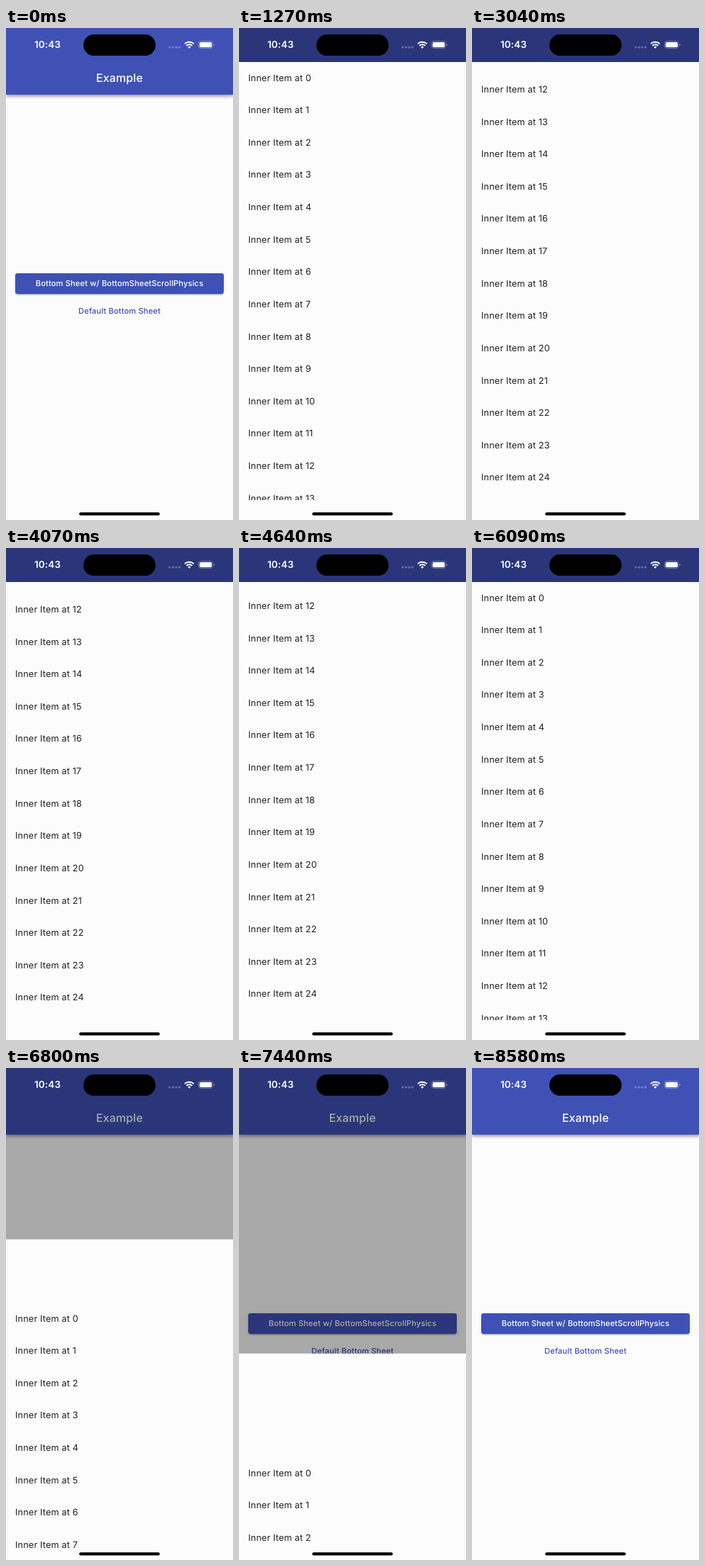
These frames come from a looping animation (320x694 px, 8660 ms). An HTML page:

```html
<!DOCTYPE html>
<html lang="en">
<head>
<meta charset="utf-8">
<title>Bottom sheet</title>
<style>
  html, body { margin: 0; width: 100%; height: 100%; overflow: hidden; background: #fcfcfc; }
  #stage {
    position: absolute; left: 0; top: 0; width: 320px; height: 694px; overflow: hidden;
    background: #fcfcfc; color: #212121;
    font-family: Inter, "Open Sans", sans-serif; white-space: nowrap;
    text-rendering: geometricPrecision;
  }
  #stage div, #stage svg { position: absolute; }
  .bar { left: 0; top: 0; width: 320px; height: 94px; background: #3f51b5;
    box-shadow: 0 1.6px 3.3px rgba(0,0,0,.2), 0 3.3px 4px rgba(0,0,0,.14), 0 .8px 8px rgba(0,0,0,.12); }
  .title { left: 0; width: 320px; top: 61px; line-height: 20px; text-align: center;
    font-size: 15.9px; letter-spacing: .2px; font-weight: 500; color: #fff; }
  .button { left: 13px; width: 294px; top: 346px; height: 29.3px; line-height: 29px;
    border-radius: 3.3px; overflow: hidden; text-align: center;
    font-size: 11.15px; letter-spacing: .13px; font-weight: 500; color: #fff; background: #3f51b5; }
  .shadow { left: 13px; width: 294px; top: 346px; height: 29.3px; border-radius: 3.3px;
    box-shadow: 0 2px 1px -1px rgba(0,0,0,.2), 0 1.6px 1.6px rgba(0,0,0,.14), 0 .8px 4px rgba(0,0,0,.12); }
  #ripple { left: 0; top: -132px; width: 294px; height: 294px; border-radius: 50%; background: #fff; }
  .link { left: 0; width: 320px; top: 389px; line-height: 20px; text-align: center;
    font-size: 11.15px; letter-spacing: .13px; font-weight: 500; color: #3f51b5; }
  #scrim { inset: 0; background: #000; }
  #sheet { left: 0; top: 48px; width: 320px; height: 646px; background: #fcfcfc; }
  .viewport { left: 0; top: 0; width: 320px; height: 618.4px; overflow: hidden; }
  #list { left: 13px; top: .6px; }
  #list div { height: 45.6px; line-height: 45.6px; font-size: 12.7px; letter-spacing: .15px; }
  .clock { left: 18.5px; width: 80px; top: 14.3px; line-height: 20px; text-align: center;
    font-size: 13.5px; letter-spacing: .15px; font-weight: 600; color: #fff; }
</style>
</head>
<body>
<div id="stage">
  <div class="bar"></div>
  <div class="title">Example</div>
  <div class="shadow"></div>
  <div class="button"><div id="ripple"></div>Bottom Sheet w/ BottomSheetScrollPhysics</div>
  <div class="link">Default Bottom Sheet</div>
  <div id="scrim"></div>
  <div id="sheet"><div class="viewport"><div id="list"></div></div></div>
  <div class="clock">10:43</div>
  <svg width="320" height="694" fill="#fff">
    <rect x="109.1" y="9" width="101.8" height="30.1" rx="15.05" fill="#000"/>
    <g opacity=".27">
      <circle cx="230.7" cy="27.2" r="1.6"/><circle cx="235.3" cy="27.2" r="1.6"/>
      <circle cx="239.9" cy="27.2" r="1.6"/><circle cx="244.5" cy="27.2" r="1.6"/>
    </g>
    <g fill="none" stroke="#fff" stroke-width="1.9">
      <path d="M252 22.4a9 9 0 0 1 12.8 0"/>
      <path d="M254.4 25a5.6 5.6 0 0 1 8 0"/>
    </g>
    <path d="M258.4 28.9l-2.1-2.2a3 3 0 0 1 4.2 0z"/>
    <rect x="271.4" y="18.6" width="20" height="10" rx="3.2" fill="none" stroke="#fff" stroke-width=".8" opacity=".4"/>
    <rect x="272.8" y="20" width="17.2" height="7.2" rx="2"/>
    <path d="M292.6 21.9v3.4a1.8 1.8 0 0 0 0-3.4z" opacity=".45"/>
    <rect x="103.2" y="683.3" width="113.6" height="4.2" rx="2.1" fill="#000"/>
  </svg>
</div>
<script>
  const LOOP = 8660, ROW = 45.615, ROWS = 25, VIEW = 618.4, SHEET = 646;
  const END = ROW * ROWS - VIEW;
  const el = id => document.getElementById(id);
  const ripple = el('ripple'), scrim = el('scrim'), sheet = el('sheet'), list = el('list');

  for (let i = 0; i < ROWS; i++) {
    const row = document.createElement('div');
    row.style.top = i * ROW + 'px';
    row.textContent = 'Inner Item at ' + i;
    list.append(row);
  }

  const progress = (t, from, to) => Math.min(1, Math.max(0, (t - from) / (to - from)));

  const bezier = (x1, y1, x2, y2) => x => {
    const at = (a, b, s) => 3 * (1 - s) * (1 - s) * s * a + 3 * (1 - s) * s * s * b + s * s * s;
    let lo = 0, hi = 1;
    for (let i = 0; i < 24; i++) {
      const mid = (lo + hi) / 2;
      if (at(x1, x2, mid) < x) lo = mid; else hi = mid;
    }
    return at(y1, y2, hi);
  };
  const decelerate = bezier(0, 0, 0.2, 1);
  const ease = bezier(0.25, 0.1, 0.25, 1);

  // Overdamped bounce: start at offset x0 with velocity v (px/s), t in ms.
  const SLOW = 9.08, FAST = 22.03;
  function spring(t, x0, v) {
    const s = t / 1000, gap = FAST - SLOW;
    const x = ((FAST * x0 + v) * Math.exp(-SLOW * s) - (SLOW * x0 + v) * Math.exp(-FAST * s)) / gap;
    return Math.abs(x) < 0.3 ? 0 : x;
  }

  // From rest to a given end slope.
  const swipe = (u, slope) => u * u * (3 - 2 * u) + slope * (u * u * u - u * u);

  const dragged = t => 361.6 * (1 - Math.pow(1 - progress(t, 6440, 7620), 2.1));
  const rubber = d => VIEW * (1 - 1 / (1 + 0.54 * d / VIEW));

  function scrollAt(t) {
    if (t < 2470) return 0;
    if (t < 2733) return END * swipe(progress(t, 2470, 2733), 0.96);
    if (t < 3980) return END + spring(t - 2733, 0, 1900);
    if (t < 4400) return END + 76 * swipe(progress(t, 3980, 4400), 0);
    if (t < 5160) return END + spring(t - 4400, 76, 0);
    if (t < 5370) return END * (1 - swipe(progress(t, 5160, 5370), 1.1));
    if (t < 6440) return -spring(t - 5370, 0, 2740);
    if (t < 8380) return -rubber(dragged(t));
    return -spring(t - 8380, rubber(dragged(t)), 0);
  }

  function render(now) {
    const t = now % LOOP;
    const shown = t < 8380 ? progress(t, 1020, 1270) : 1 - progress(t, 8380, 8580);
    const press = progress(t, 780, 1020);
    const y = Math.min(SHEET, SHEET * (1 - decelerate(shown)) + dragged(t));

    ripple.style.transform = `scale(${0.2 + 0.9 * decelerate(press)})`;
    ripple.style.opacity = t < 1270 ? 0.2 * Math.min(1, press * 3) * (1 - progress(t, 1020, 1200)) : 0;
    scrim.style.opacity = 0.335 * ease(shown);
    sheet.style.transform = `translateY(${y}px)`;
    sheet.style.visibility = shown > 0 ? 'visible' : 'hidden';
    list.style.transform = `translateY(${-scrollAt(t)}px)`;
  }

  const start = performance.now();
  function tick() {
    render(performance.now() - start);
    requestAnimationFrame(tick);
  }
  tick();
</script>
</body>
</html>
```
